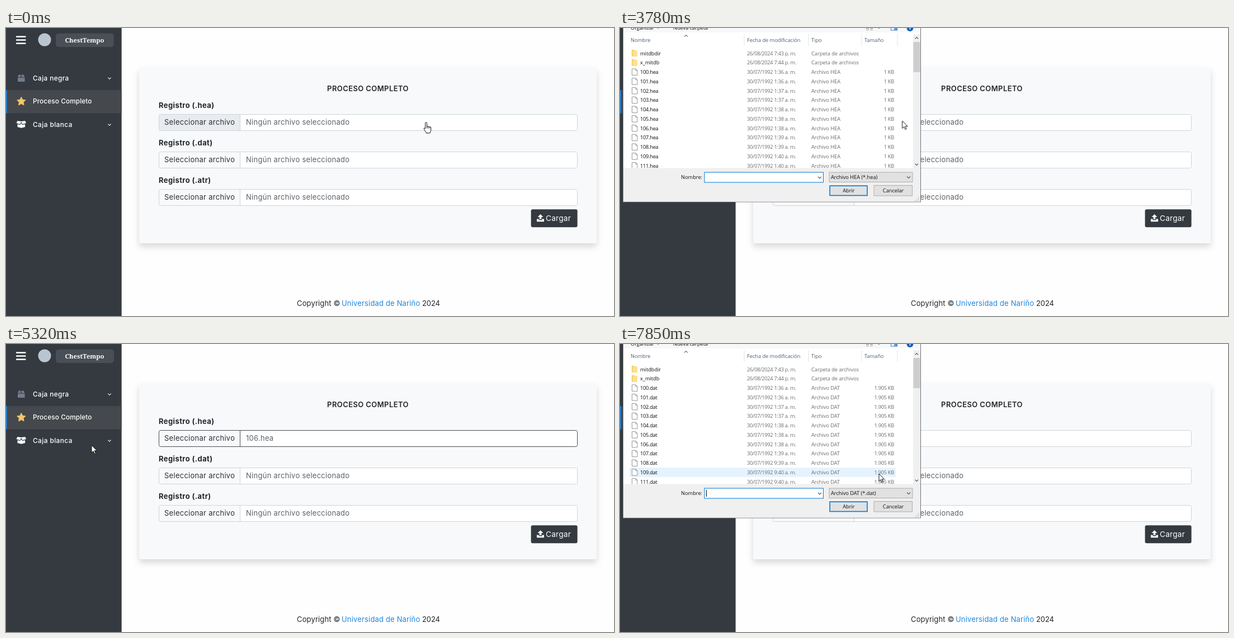
These frames come from a looping animation (1087x515 px, 8 s). An HTML page:

```html
<!DOCTYPE html>
<html lang="es">
<head>
<meta charset="utf-8">
<title>Proceso completo</title>
<style>
html, body { margin: 0; width: 100%; height: 100%; overflow: hidden; background: #fefefe; }
svg { display: block; width: 1087px; height: 515px; }
text { font: 13px Inter, sans-serif; letter-spacing: .27px; fill: #212529; white-space: pre; }
.title { font-weight: 600; letter-spacing: .4px; }
.label { font-weight: 700; letter-spacing: .4px; }
.mid { text-anchor: middle; }
.end { text-anchor: end; }
.value { fill: #5d6166; }
.pick { fill: #2b3036; }
.link { fill: #2186dd; letter-spacing: .17px; }
.load { font-size: 13.6px; fill: #fff; }
.nav { font-size: 11.8px; font-weight: 500; fill: #fff; }
.brand { font: 900 11.2px "Noto Serif", serif; letter-spacing: 0; fill: #fff; }
.card { filter: drop-shadow(0 6px 6px rgba(0,0,0,.15)); }
.dlg text { font: 9.3px "Open Sans", sans-serif; letter-spacing: -.05px; fill: #111; }
.dlg .num { letter-spacing: -.3px; }
.dlg .dim { fill: #6d6d6d; }
.dlg .head { fill: #4c607a; }
.line { fill: none; stroke-width: 1; }
.frame { stroke: #ced4da; }

/* One shared 8 s timeline: 1 % = 80 ms */
.cut, .ease { animation-duration: 8s; animation-iteration-count: infinite; }
.cut { animation-timing-function: step-end; }
.ease { animation-timing-function: linear; }

.before { animation-name: before; }
.after { animation-name: after; }
@keyframes before { 0% { opacity: 1 } 65.375% { opacity: 0 } }
@keyframes after { 0% { opacity: 0 } 65.375% { opacity: 1 } }

.frame0 { animation-name: frame0; }
.frame1 { animation-name: frame1; }
@keyframes frame0 {
  0%, 6.25% { stroke: #ced4da } 8.1%, 33% { stroke: #6c757d }
  35%, 65.37% { stroke: #ced4da } 65.375%, 80.125% { stroke: #4a4f54 }
  82%, 100% { stroke: #ced4da }
}
@keyframes frame1 {
  0%, 80.125% { stroke: #ced4da } 82%, 94% { stroke: #6c757d }
  95.4%, 100% { stroke: #ced4da }
}
.btn0 { animation-name: btn0; }
.btn1 { animation-name: btn1; }
@keyframes btn0 { 0%, 65.37% { fill: #e9ecef } 65.375%, 100% { fill: #f8f9fa } }
@keyframes btn1 {
  0%, 73% { fill: #f8f9fa } 75%, 80.125% { fill: #eef0f3 } 82%, 100% { fill: #e9ecef }
}

.dlg.hea { animation-name: openHea; }
.dlg.dat { animation-name: openDat; }
.rows.hea { animation-name: rowsHea; }
.rows.dat { animation-name: rowsDat; }
@keyframes openHea { 0% { opacity: 0 } 36.25% { opacity: 1 } 65.375% { opacity: 0 } }
@keyframes openDat { 0% { opacity: 0 } 95.5% { opacity: 1 } }
@keyframes rowsHea { 0% { opacity: 0 } 37.125% { opacity: 1 } }
@keyframes rowsDat { 0% { opacity: 0 } 96.125% { opacity: 1 } }

.caret.hea { animation-name: caretHea; }
@keyframes caretHea {
  0% { opacity: 1 } 46.25% { opacity: 0 } 52.875% { opacity: 1 } 57.625% { opacity: 0 }
}
.chosen { animation-name: chosen; }
@keyframes chosen { 0% { opacity: 0 } 57.625% { opacity: 1 } }

/* Row height is 16.75px */
.hover.hea { animation-name: hoverHea; }
.hover.dat { transform: translateY(184.25px); }
@keyframes hoverHea {
  0% { opacity: 0; transform: translateY(117.25px) }
  47.75% { opacity: 1; transform: translateY(117.25px) }
  48% { opacity: 1; transform: translateY(134px) }
  49.75% { opacity: 1; transform: translateY(150.75px) }
  51.5% { opacity: 1; transform: translateY(167.5px) }
  53.25% { opacity: 1; transform: translateY(184.25px) }
  54.5% { opacity: 1; transform: translateY(134px) }
}

.pointer { animation-name: pointer; }
@keyframes pointer {
  0%, 43.875% { transform: translate(751px, 169px) }
  47.25% { transform: translate(505px, 166px) }
  53.875% { transform: translate(343px, 226px) }
  54.5%, 57% { transform: translate(154px, 188px) }
  58.75%, 66.875% { transform: translate(153px, 181px) }
  69.375% { transform: translate(175px, 197px) }
  71.75% { transform: translate(284px, 201px) }
  76.125% { transform: translate(456px, 227px) }
  78.25%, 100% { transform: translate(463px, 232px) }
}
.hand { animation-name: hand; }
.arrow { animation-name: arrow; }
.busy { animation-name: busy; }
@keyframes hand {
  0% { opacity: 1 } 6.875% { opacity: 0 } 73.125% { opacity: 1 } 85.875% { opacity: 0 }
}
@keyframes arrow {
  0% { opacity: 0 } 6.875% { opacity: 1 } 73.125% { opacity: 0 } 85.875% { opacity: 1 }
}
@keyframes busy {
  0% { opacity: 0 } 6.875% { opacity: 1 } 35% { opacity: 0 }
  85.875% { opacity: 1 } 95% { opacity: 0 }
}
.spin { animation: spin 1s linear infinite; }
@keyframes spin { to { transform: rotate(360deg) } }
</style>
</head>
<body>
<svg id="stage" viewBox="0 0 1087 515"></svg>
<script>
const text = (x, y, s, cls = '', gap) =>
  `<text x="${x}" y="${y}" class="${cls}"${gap === undefined ? '' : ` style="letter-spacing:${gap}px"`}>${s}</text>`;
const rect = (x, y, w, h, fill, extra = '') =>
  `<rect x="${x}" y="${y}" width="${w}" height="${h}" fill="${fill}" ${extra}/>`;
const path = (d, fill, extra = '') => `<path d="${d}" fill="${fill}" ${extra}/>`;
const chevron = (x, y, r, color, dir = 1) =>
  path(`M${x - r} ${y - dir * r / 2}l${r} ${dir * r} ${r} ${-dir * r}`, 'none', `stroke="${color}" stroke-width="1.1"`);

function star(cx, cy, r) {
  const points = Array.from({ length: 10 }, (_, i) => {
    const a = i * Math.PI / 5, k = i % 2 ? r * .5 : r;
    return `${(cx + k * Math.sin(a)).toFixed(1)},${(cy - k * Math.cos(a)).toFixed(1)}`;
  });
  return `<polygon points="${points.join(' ')}" fill="#f9c46a" stroke="#f9c46a" stroke-linejoin="round"/>`;
}

function sidebar() {
  const bars = [15.5, 21.5, 27.5].map(y => rect(18, y - 1.2, 17.5, 2.4, '#fff', 'rx=".6"')).join('');
  return rect(0, 0, 206.7, 515, '#353940') + rect(0, 111, 206.7, 41.5, '#45494d') +
    rect(0, 111, 1.6, 41.5, '#1f86e4') + bars +
    '<circle cx="69" cy="21" r="11.5" fill="#b9c6d2"/>' +
    rect(89, 9.5, 104, 24.5, '#494f57', 'rx="5"') + text(140.5, 25.5, 'ChestTempo', 'brand mid') +
    path('M22.5 83.5h4v4.2h-5.3zM27.7 83.5h4l1.6 4.2h-5.6zM21 88.7h12.6V95q0 1-1 1H22q-1 0-1-1z', '#727d8b') +
    star(27.3, 131.4, 8) +
    path('M20.5 166l6.8 1 6.8-1 2 4-6.3 1.9-2.5-4-2.5 4-6.3-1.9zM20.5 172l4.7 1.3 2.1-3 2.1 3 4.7-1.3v5l-6.8 1.8-6.8-1.8z', '#fff') +
    text(48, 94, 'Caja negra', 'nav', .4) + text(48, 135, 'Proceso Completo', 'nav', .1) +
    text(48, 176.5, 'Caja blanca', 'nav', .45) +
    chevron(185, 90, 2.6, '#fff') + chevron(185, 173, 2.6, '#fff');
}

function field(ext, i) {
  const y = 154 + 67 * i, empty = 'Ningún archivo seleccionado';
  const value = i ? text(429, y + 19, empty, 'value')
    : text(429, y + 19, empty, 'value cut before') + text(429, y + 19, '106.hea', 'value cut after');
  return text(273, y - 11, `Registro (.${ext})`, 'label') +
    rect(273.5, y + .5, 748, 29, '#fff', 'rx="3"') +
    path(`M418.5 ${y + .5}v29h-142q-3 0-3-3v-23q0-3 3-3z`, '#f8f9fa', `class="ease btn${i}"`) +
    text(283, y + 19, 'Seleccionar archivo', 'pick') + value +
    `<g class="line frame ease frame${i}">${rect(273.5, y + .5, 748, 29, 'none', 'rx="3"')}` +
    `<path d="M418.5 ${y + .5}v29"/></g>`;
}

function page() {
  return rect(206, 0, 881, 515, '#fefefe') +
    rect(238, 71, 818, 314, '#f8f9fb', 'rx="3" class="card"') +
    text(647, 113, 'PROCESO COMPLETO', 'title mid') +
    ['hea', 'dat', 'atr'].map(field).join('') +
    rect(938.6, 324.2, 83, 32, '#343a40', 'rx="3"') +
    path('M955.5 333l5 5h-3.2v4h-3.6v-4h-3.2zM949 341.5h3.6v2h5.8v-2h3.6v4.7h-13z', '#fff') +
    text(965, 344.5, 'Cargar', 'load') +
    text(520, 497, 'Copyright ©', '', .15) +
    text(600, 497, 'Universidad de Nariño', 'link') + text(744, 497, '2024', '', -.1);
}

function fileRow(i, name, date, type, size) {
  const top = 36.9 + 16.75 * i, y = top + 11.6;
  const icon = i < 2
    ? path(`M21 ${top + 2}h4l1 1.5h5v10.5H21z`, '#f3cd62') + rect(22.5, top + 4, 8.5, 10, '#ffe08c')
    : path(`M21.5 ${top + 2.5}h6.5l3 3v8.5h-9.5zM28 ${top + 2.5}v3h3`, '#fff', 'stroke="#8b8b8b" stroke-width=".9"');
  return icon + text(36, y, name, i < 2 ? '' : 'num') + text(227, y, date, 'num dim') +
    text(342, y, type, 'dim') + text(490, y, size, 'num dim end');
}

function fileList(ext) {
  const up = ext.toUpperCase(), minutes = [36, 36, 37, 37, 38, 38, 38, 39, 39, 40, 40];
  const files = minutes.map((m, i) => {
    const hour = ext === 'dat' && i > 7 ? 9 : 1;
    return fileRow(i + 2, `${i < 10 ? 100 + i : 111}.${ext}`, `30/07/1992 ${hour}:${m} a. m.`,
      `Archivo ${up}`, ext === 'dat' ? '1.905 KB' : '1 KB');
  });
  return fileRow(0, 'mitdbdir', '26/08/2024 7:43 p. m.', 'Carpeta de archivos', '') +
    fileRow(1, 'x_mitdb', '26/08/2024 7:44 p. m.', 'Carpeta de archivos', '') + files.join('');
}

function dialog(ext) {
  const isHea = ext === 'hea';
  const heads = [[19, 'Nombre'], [227, 'Fecha de modificación'], [342, 'Tipo'], [437, 'Tamaño']];
  const grip = [[534, 303], [531, 306], [534, 306], [528, 309], [531, 309], [534, 309]];
  const chosen = isHea ? `<g class="cut chosen">${rect(17.5, 171.3, 475.5, 16.2, '#cce8ff', 'stroke="#99d1ff"')}</g>` : '';
  return `<g class="dlg cut ${ext}">` +
    rect(5.5, -5, 532, 316, '#fff', 'stroke="#6f7378"') + rect(6, 0, 531, 8, '#f7f8f9') +
    text(19, 2.8, 'Organizar') + chevron(68, -.5, 2, '#444') + text(95, 2.8, 'Nueva carpeta') +
    rect(440, 0, 5, 1, '#777') + rect(447, 0, 5, 1, '#777') +
    rect(440, 3, 5, 1, '#999') + rect(447, 3, 5, 1, '#999') + chevron(463, -.5, 2, '#444') +
    rect(484.5, -4, 11, 8, '#fff', 'stroke="#4d78a8"') + rect(490, 0, 5, 4, '#5c9bd8') +
    '<circle cx="518.5" cy="0" r="6" fill="#1261b5"/>' + rect(517.8, 0, 1.4, 3, '#fff') +
    heads.map(([x, s]) => text(x, 25.3, s, 'head')).join('') +
    [222, 337, 432, 496].map(x => rect(x - .5, 11, 1, 21, '#e3e3e3')).join('') +
    chevron(118, 14, 3, '#777', -1) +
    rect(17, 36.9, 476, 16.75, '#e5f3ff', `class="cut hover ${ext}"`) + chosen +
    `<g class="rows cut ${ext}">${fileList(ext)}</g>` +
    rect(524, 11, 13, 240, '#f0f0f0') + rect(524.5, 25, 12, 54, '#cdcdcd') +
    chevron(530.3, 18, 2.8, '#505050', -1) + chevron(530.3, 244, 2.8, '#505050') +
    rect(6, 250.5, 531, 60, '#f0f0f0') + text(147, 270, 'Nombre:', 'end') +
    rect(151, 258, 212.5, 18, '#fff', 'stroke="#0078d7"') + chevron(357, 267.5, 3, '#555') +
    rect(374, 258, 149, 17.5, '#e1e1e1', 'stroke="#adadad"') + chevron(516, 267, 3, '#555') +
    text(377, 270, `Archivo ${ext.toUpperCase()} (*.${ext})`) +
    rect(375.2, 282.2, 66.8, 17.3, '#e1e1e1', 'stroke="#0078d7" stroke-width="1.6"') +
    rect(454, 281.5, 68.5, 18.5, '#e1e1e1', 'stroke="#adadad"') +
    text(408.8, 294, 'Abrir', 'mid') + text(488.5, 294, 'Cancelar', 'mid') +
    grip.map(([x, y]) => rect(x - .7, y - .7, 1.4, 1.4, '#b4b4b4')).join('') +
    rect(154, 261, 1, 12, '#000', `class="cut caret ${ext}"`) +
    (isHea ? text(154, 270.5, '106.hea', 'num cut chosen') : '') + '</g>';
}

function pointer() {
  const ink = 'stroke="#111" stroke-width="1" stroke-linejoin="round"';
  const hand = 'M-1.4 11V1.2a1.45 1.45 0 0 1 2.9 0V7q1.5-1 2.6.4 1.5-.8 2.4.5 2.2-.6 2.2 1.6V13q0 2.5-1.5 4.8v1H0v-1.3Q-2 15-3.8 11.6q-.6-1.7.9-1.7z';
  return '<g class="ease pointer">' +
    `<g class="cut hand">${path(hand, '#fff', ink)}${path('M1.5 7v3.5M4.1 7.4v3.1M6.5 7.9v2.6', 'none', ink)}</g>` +
    `<g class="cut arrow">${path('M0 0V13.4l3.1-2.9 2.2 4.9 2-.9-2.1-4.7h4.3z', '#fff', ink)}</g>` +
    '<g class="cut busy"><g transform="translate(11 0)">' +
    '<circle r="4.2" fill="#fff" stroke="#1e88e0" stroke-width="3.4"/>' +
    '<circle r="4.2" fill="none" stroke="#6fbcf5" stroke-width="2.4" stroke-dasharray="7 30" class="spin"/>' +
    '</g></g></g>';
}

document.getElementById('stage').innerHTML =
  page() + sidebar() + dialog('hea') + dialog('dat') + pointer();
</script>
</body>
</html>
```
